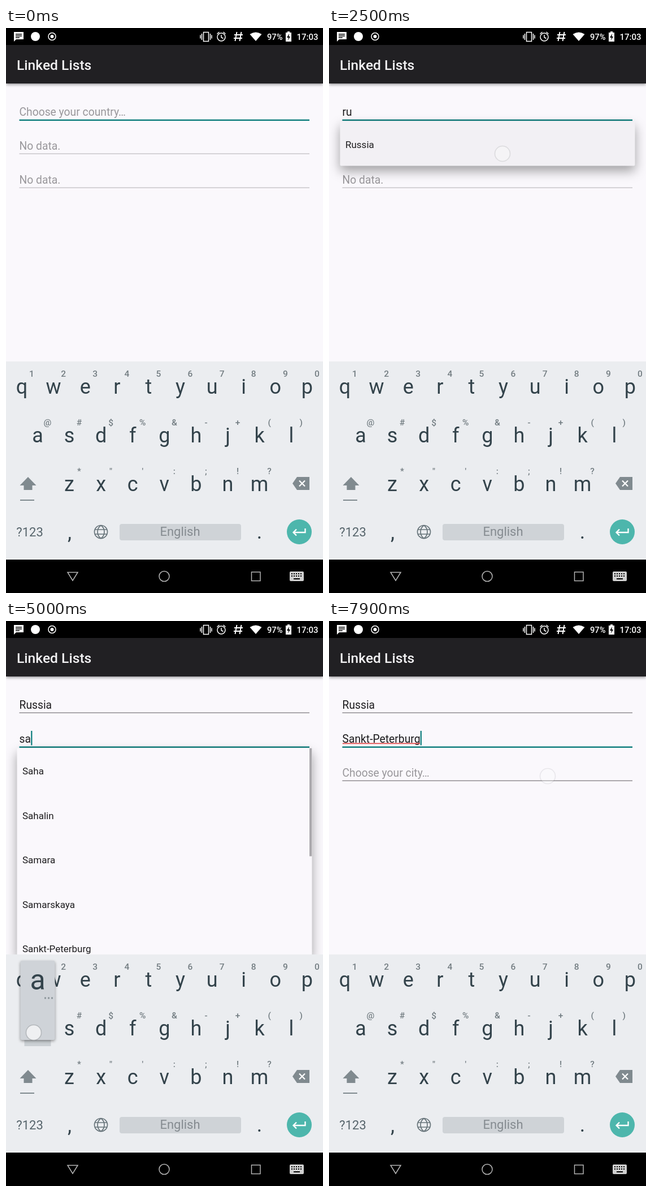
Write an HTML page with a canvas that moves like this. It is 561x998 px and loops after 8 s.

```html
<!DOCTYPE html>
<html lang="en">
<head>
<meta charset="utf-8">
<title>Linked Lists</title>
<style>
html, body { margin: 0; width: 561px; height: 998px; overflow: hidden; background: #faf8fc; }
canvas { display: block; }
</style>
</head>
<body>
<canvas id="stage" width="561" height="998"></canvas>
<script>
const ctx = document.getElementById('stage').getContext('2d');
const LOOP = 8000, TEAL = '#12807f', INK = '#33434b', ICON = '#808a8f';
const FIELD_SIZE = 19.3, ROW = 78.6, KEYBOARD_TOP = 589;

const ROWS = [
  { x: 28, y: 646, keys: 'qwertyuiop', hints: '1234567890' },
  { x: 56, y: 732, keys: 'asdfghjkl', hints: '@#$%&-+()' },
  { x: 112, y: 818, keys: 'zxcvbnm', hints: '*"\':;!?' },
];

// Each step is [start time, value].
const FIELDS = [
  { base: 155, text: [[0, ''], [1200, 'r'], [1600, 'ru'], [3100, 'Russia']],
    hint: [[0, 'Choose your country…']], enabled: 0 },
  { base: 215, text: [[0, ''], [4900, 's'], [5000, 'sa'], [6200, 'san'], [7100, 'Sankt-Peterburg']],
    hint: [[0, 'No data.'], [3100, 'Choose your state…']], enabled: 3100 },
  { base: 275, text: [[0, '']],
    hint: [[0, 'No data.'], [7100, 'Choose your city…']], enabled: 7100 },
];

const CARET_ON = [[400, 900], [1100, 2200], [3700, 4300], [4800, 5600], [6100, 6800], [6900, 7400], [7700, 8000]];

const S_NAMES = ['Saha', 'Sahalin', 'Samara', 'Samarskaya', 'Sankt-Peterburg'];
const POPUPS = [
  { open: 1350, close: 3100, top: 165, pressed: 2250, lists: [
    [1350, { items: ['Reunion', 'Romania', 'Russia', 'Rwanda'] }],
    [1700, { items: ['Russia'] }]] },
  { open: 4020, close: 7000, top: 224.5, pressed: 6850, lists: [
    [4020, { items: ['Adygeya', 'Altay', 'Altayskiy', 'Amurskaya', 'Arhangelskaya'], thumb: 24 }],
    [4900, { items: S_NAMES, thumb: 140 }],
    [5000, { items: S_NAMES, thumb: 191 }],
    [6300, { items: ['Sankt-Peterburg'] }]] },
];

const TAPS = [
  { down: 1100, up: 1200, gone: 1290, x: 194, y: 645, key: 'r' },
  { down: 1450, up: 1600, gone: 1700, x: 362, y: 645, key: 'u' },
  { down: 2200, up: 2300, gone: 2700, x: 307, y: 222 },
  { down: 3700, up: 3800, gone: 4050, x: 314.5, y: 216 },
  { down: 4800, up: 4900, gone: 4950, x: 108, y: 728, key: 's' },
  { down: 4950, up: 5080, gone: 5200, x: 49, y: 727, key: 'a' },
  { down: 6100, up: 6250, gone: 6350, x: 390, y: 815, key: 'n' },
  { down: 6800, up: 6950, gone: 7150, x: 300, y: 272 },
  { down: 7700, up: 7800, gone: 7960, x: 387, y: 274 },
];

const stepAt = (steps, t) => steps.filter(([start]) => start <= t).pop()[1];

function text(str, x, y, size, color, align = 'left', weight = 400) {
  ctx.font = `${weight} ${size}px Roboto, sans-serif`;
  ctx.textAlign = align;
  ctx.fillStyle = color;
  ctx.fillText(str, x, y);
}

function rect(x, y, w, h, color, radius = 0) {
  ctx.fillStyle = color;
  ctx.beginPath();
  ctx.roundRect(x, y, w, h, radius);
  ctx.fill();
}

function path(d, { fill, stroke, width = 1.5 }) {
  const p = new Path2D(d);
  if (fill) { ctx.fillStyle = fill; ctx.fill(p); }
  if (stroke) { ctx.strokeStyle = stroke; ctx.lineWidth = width; ctx.stroke(p); }
}

function circle(x, y, r, { fill, stroke, width = 1.5 }) {
  ctx.beginPath();
  ctx.arc(x, y, r, 0, 7);
  if (fill) { ctx.fillStyle = fill; ctx.fill(); }
  if (stroke) { ctx.strokeStyle = stroke; ctx.lineWidth = width; ctx.stroke(); }
}

function withShadow(color, blur, dy, draw) {
  ctx.save();
  ctx.shadowColor = color;
  ctx.shadowBlur = blur;
  ctx.shadowOffsetY = dy;
  draw();
  ctx.restore();
}

function drawStatusBar() {
  const white = { fill: '#fff' }, line = { stroke: '#fff' };
  rect(0, 0, 561, 30, '#000');
  path('M14 7H31V20H18L14 24Z', white);
  path('M17 11H28M17 14H28M17 17H24', { stroke: '#000' });
  circle(52, 15, 8, white);
  circle(81.5, 15, 6.5, line);
  circle(81.5, 15, 3, white);
  path('M349.5 7.5H358.5V23.5H349.5ZM346.5 10V21M361.5 10V21M344 12.5V18.5M364 12.5V18.5', line);
  circle(381, 16, 7, line);
  path('M381 12V16.5L384.5 18.5M373.5 10.5L377.5 7M388.5 10.5L384.5 7', line);
  path('M408.5 7L405.5 23M416.5 7L413.5 23M404 12H419M403 18H418', { stroke: '#fff', width: 2 });
  path('M431.5 11Q442 4 452.5 11L442 23Z', white);
  text('97%', 462, 20.5, 14.7, '#fff', 'left', 500);
  path('M495 8H498V6H502V8H505V24H495Z', white);
  path('M501 10L497 17H500L499 22L503 15H500.5Z', { fill: '#000' });
  text('17:03', 514.5, 20.5, 15, '#fff', 'left', 500);
}

function drawAppBar() {
  withShadow('rgba(0,0,0,.4)', 5, 2, () => rect(0, 30, 561, 68, '#212023'));
  text('Linked Lists', 19, 73.5, 24.6, '#f3f2f4', 'left', 500);
}

function drawField(field, index, t) {
  const { base } = field;
  const value = stepAt(field.text, t);
  const focused = index === (t < 3800 ? 0 : 1);
  const enabled = t >= field.enabled;
  if (value) text(value, 23.5, base, FIELD_SIZE, '#1d1c1e');
  else text(stepAt(field.hint, t), 23.5, base, FIELD_SIZE, focused && index ? '#757477' : '#99979b');

  if (focused) rect(23.5, base + 6.5, 513.5, 2.5, TEAL);
  else rect(23.5, base + 6.5, 513.5, 1.3, enabled ? '#7c7a7e' : '#bfbdc1');

  ctx.font = `${FIELD_SIZE}px Roboto, sans-serif`;
  const width = ctx.measureText(value).width;
  if (index === 1 && t >= 7700) rect(24, base + .5, width - 1, 1.8, '#e04a4a');
  if (focused && CARET_ON.some(([on, off]) => t >= on && t < off))
    rect(23.7 + width, base - 21, 2.3, 25.5, TEAL);
}

function drawPopup({ open, close, top, pressed, lists }, t) {
  if (t < open || t >= close + 100) return;
  const { items, thumb } = stepAt(lists, t);
  const height = Math.min(items.length * ROW, 591 - top);
  ctx.save();
  ctx.globalAlpha = Math.min(1, (t - open) / 140, (close + 100 - t) / 130);
  withShadow('rgba(0,0,0,.36)', 20, 9, () =>
    rect(19.5, top, 522, height, t >= pressed ? '#f2f0f4' : '#faf8fc', 2.5));
  ctx.beginPath();
  ctx.rect(19.5, top, 522, height);
  ctx.clip();
  items.forEach((item, i) => text(item, 29, top + 46.5 + i * ROW, 17, '#1d1c1e'));
  if (thumb) rect(537, top, 4.5, thumb, '#aba9ad');
  ctx.restore();
}

function drawKeyboard() {
  rect(0, KEYBOARD_TOP, 561, 350, '#ebedf0');
  ROWS.forEach(({ x, y, keys, hints }) => [...keys].forEach((key, i) => {
    const cx = x + i * 56.1;
    text(key, cx, y, 36, INK, 'center');
    text(hints[i], cx + 17.5, y - 30, 15.5, '#737d82', 'center', 500);
  }));

  path('M39 793L53.5 808H46.5V816H31.5V808H24.5Z', { fill: ICON });
  rect(25, 833, 25, 2, ICON);
  path('M507 804.5L515 793H537V816H515Z', { fill: ICON });
  path('M519 799.5L529 809.5M529 799.5L519 809.5', { stroke: '#fff', width: 2.2 });

  text('?123', 42, 898, 22, '#56646b', 'center');
  text(',', 112.5, 903, 36, INK, 'center');
  text('.', 448.5, 902, 36, INK, 'center');
  const globe = { stroke: '#67747a', width: 1.7 };
  circle(168, 890, 11.5, globe);
  path('M168 878.5C160 884 160 896 168 901.5C176 896 176 884 168 878.5M157.5 886H178.5M157.5 894H178.5', globe);
  rect(201, 876, 215, 29, '#cfd3d7', 4);
  text('English', 308, 897, 22, '#858b90', 'center');
  circle(519, 890, 22, { fill: '#4db6ac' });
  path('M529.5 884V891H509M514 885.5L508.5 891L514 896.5', { stroke: '#fff', width: 2.3 });
}

function drawNavBar() {
  const line = { stroke: '#b4b4b4', width: 1.5 };
  rect(0, 939, 561, 59, '#000');
  path('M109 961.5H127L118 976Z', line);
  circle(280, 968.5, 9, line);
  path('M434.5 961H450V976.5H434.5Z', line);
  rect(502, 960, 25, 17, '#cfcfcf', 2);
  for (let i = 0; i < 10; i++) rect(505 + (i % 5) * 4, 963 + (i > 4) * 4, 2, 2, '#000');
  rect(509, 972, 11, 2, '#000');
}

function drawKeyPreview(key) {
  const row = ROWS.find(r => r.keys.includes(key));
  const cx = row.x + row.keys.indexOf(key) * 56.1;
  rect(cx - 23.5, row.y - 50, 47, 69, '#cbd0d4');
  withShadow('rgba(0,0,0,.4)', 5, 2, () => rect(cx - 30.5, row.y - 132, 61, 140, '#cfd3d8', 3));
  text(key, cx, row.y - 81, 50, INK, 'center');
  for (let i = 0; i < 3; i++) rect(cx + 12 + i * 6, row.y - 67.5, 3, 3, '#8d969b');
}

function drawTap({ down, up, gone, x, y, key }, t) {
  if (t < down || t >= gone) return;
  if (key && t < up) drawKeyPreview(key);
  ctx.globalAlpha = t < up ? 1 : (gone - t) / (gone - up);
  circle(x, y, 13.5, { fill: 'rgba(250,250,251,.75)', stroke: 'rgba(90,95,100,.3)', width: 1.6 });
  ctx.globalAlpha = 1;
}

function draw(t) {
  if (t > 2500 && t < 3100) t = 2500;
  rect(0, 0, 561, 998, '#faf8fc');
  drawAppBar();
  drawStatusBar();
  FIELDS.forEach((field, i) => drawField(field, i, t));
  POPUPS.forEach(popup => drawPopup(popup, t));
  drawKeyboard();
  drawNavBar();
  TAPS.forEach(tap => drawTap(tap, t));
}

const start = performance.now();
function tick() {
  draw((performance.now() - start) % LOOP);
  requestAnimationFrame(tick);
}
tick();
</script>
</body>
</html>
```
